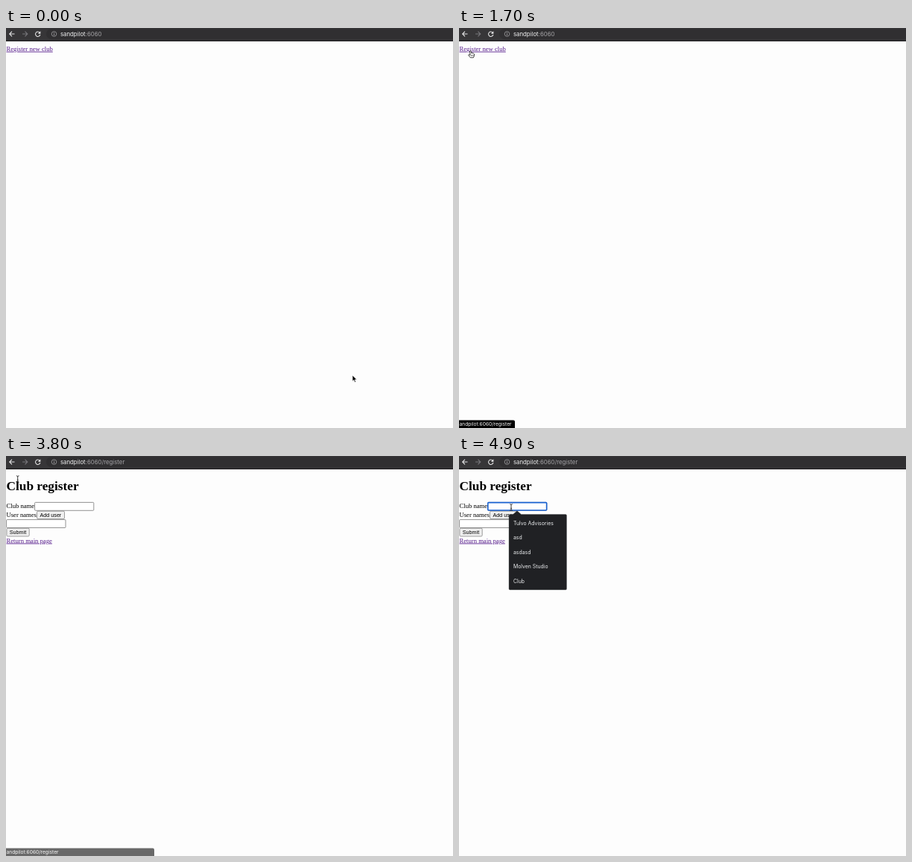
An HTML page for the animation above (5 s loop, 600 by 538 pixels).

```html
<!DOCTYPE html>
<html lang="en">
<head>
<meta charset="utf-8">
<title>Club register</title>
<style>
  html, body { margin: 0; width: 100%; height: 100%; overflow: hidden; background: #fdfdfd; }
  svg { display: block; width: 100vw; height: 100vh; }
  .ui { font-family: Inter, sans-serif; }
  .page { font: 8.65px "Liberation Serif", serif; }
  .page h1, .heading { font-size: 17.3px; font-weight: bold; }
  .link { fill: #551a8b; text-decoration: underline; }
  .field { fill: #fff; stroke: #767676; stroke-width: .8; }
  .button rect { fill: #efefef; stroke: #767676; stroke-width: .7; }
  .button text { font: 7.2px "Liberation Sans", sans-serif; }
  .icon { fill: none; stroke: #e4e4e5; stroke-width: 1.1; }
</style>
</head>
<body>
<svg viewBox="0 0 600 538">
  <g id="home" class="page">
    <text id="registerLink" class="link" x=".5" y="30.7">Register new club</text>
  </g>

  <g id="form" class="page">
    <text class="heading" x=".5" y="46">Club register</text>
    <text x=".5" y="70.2">Club name</text>
    <rect class="field" x="38.6" y="62.4" width="79.2" height="10.9" rx="1"/>
    <text x=".5" y="81.6">User names</text>
    <g class="button">
      <rect x="41.5" y="74.2" width="37" height="10.4" rx="1.5"/>
      <text x="45.5" y="81.8">Add user</text>
    </g>
    <rect class="field" x=".6" y="85.6" width="79.4" height="10.9" rx="1"/>
    <g class="button">
      <rect x=".9" y="97.2" width="30.3" height="10.8" rx="1.5"/>
      <text x="4.8" y="105.1">Submit</text>
    </g>
    <text class="link" x=".5" y="116.5">Return main page</text>
    <rect id="focus" x="38.8" y="62.6" width="78.8" height="10.4" rx="1" fill="#fff" stroke="#1a62d2" stroke-width="1.6"/>
  </g>

  <g id="popup" class="ui" font-size="6.9" fill="#eceef0">
    <path d="M68.5 78.5H72.5L78 73.8 83.5 78.5H143a1.5 1.5 0 0 1 1.5 1.5V178.500a1.500 1.500 0 0 1-1.500 1.500H68.500a1.500 1.500 0 0 1-1.500-1.500V80a1.500 1.500 0 0 1 1.500-1.500z" fill="#202124" stroke="#55565a" stroke-width=".4"/>
  </g>

  <g id="bar" class="ui" font-size="7.8">
    <rect width="600" height="18" fill="#373638"/>
    <rect y="16.5" width="600" height="1.5" fill="#252426"/>
    <rect x="54" y="1" width="560" height="14.2" rx="7.1" fill="#302f31"/>
    <path class="icon" d="M11.500 8H4.800M8 4.700 4.700 8 8 11.300"/>
    <path class="icon" d="M22 8h6.700M25.500 4.700 28.800 8 25.500 11.300" style="stroke:#77767a"/>
    <path class="icon" d="M45.300 6.300A3.200 3.200 0 1 0 45.900 8.800"/>
    <path d="M46.400 4.200V7.700H42.900z" fill="#e4e4e5"/>
    <circle class="icon" cx="64.500" cy="8" r="3.300" style="stroke:#a3a2a5;stroke-width:.8"/>
    <path d="M64.500 6v.9M64.500 7.500V10" stroke="#a3a2a5" stroke-width=".9"/>
    <text x="73" y="10.800" fill="#f0f0f1">sandpilot<tspan fill="#a5a4a7">:6060<tspan id="path">/register</tspan></tspan></text>
  </g>

  <g id="status" class="ui" font-size="6.65">
    <path id="bubble" fill="#000"/>
    <text x="-3" y="535.300" fill="#f4f4f4">sandpilot:6060/register</text>
  </g>

  <g id="arrow">
    <path d="M0 0V8.200L1.900 6.500 3.200 9.400 4.600 8.800 3.300 5.900H5.900z" fill="#000" stroke="#fff" stroke-width=".7"/>
  </g>
  <g id="hand">
    <path d="M-1 .4Q-.2-.6.6.4L1.200 3 2.600 2.900 4 3.400 5 4.200 4.800 7 3.900 9H-.2L-2.700 6Q-3 4.800-1.800 4.900L-.4 5.800z" transform="translate(0 .3)" fill="#fff" stroke="#111" stroke-width=".8" stroke-linejoin="round"/>
    <path d="M1.100 5.500v2M2.400 5.500v2M3.600 5.500v2" stroke="#222" stroke-width=".5"/>
  </g>
  <g id="beam">
    <path d="M-1.800-4.300Q0-4.300 0-3.200 0-4.300 1.800-4.300M0-3.300V3.300M-1.800 4.300Q0 4.300 0 3.200 0 4.300 1.800 4.300M-.9 1.400H.9" fill="none" stroke="#222" stroke-width=".9"/>
  </g>
</svg>
<script>
const LOOP = 5000, STEP = 100;
const $ = id => document.getElementById(id);
const show = (id, on) => { $(id).style.display = on ? "" : "none"; };

// Pointer: start time, shape, x, y
const pointer = [
  [0, "arrow", 465, 467],
  [400, "arrow", 418, 325],
  [500, "arrow", 341, 131.500],
  [800, "arrow", 172.500, 63.500],
  [900, "arrow", 1, 28.500],
  [1200, "hand", 15.500, 30.500],
  [3800, "beam", 15.700, 31],
  [3900, "beam", 50, 55],
  [4000, "arrow", 84, 78],
  [4400, "beam", 75, 71],
  [4500, "beam", 70, 69]
];

["Tulvo Advisories", "asd", "asdasd", "Molven Studio", "Club"].forEach((label, i) => {
  const text = document.createElementNS($("popup").namespaceURI, "text");
  text.setAttribute("x", 73);
  text.setAttribute("y", 92.500 + i * 19.500);
  text.textContent = label;
  $("popup").append(text);
});

function statusOpacity(t) {
  if (t < 1200) return 0;
  if (t < 3800) return Math.min(1, (t - 1100) / 600);
  return Math.max(0, .58 - (t - 3800) / 100 * .32);
}

function draw(now) {
  const t = Math.floor(now % LOOP / STEP) * STEP;
  const registering = t >= 3400;

  show("home", !registering);
  show("form", registering);
  show("path", registering);
  show("focus", t >= 4800);
  show("popup", t >= 4900);
  $("registerLink").style.fill = t >= 3300 ? "#333" : "";

  const right = registering ? 199 : 75;
  $("bubble").setAttribute("d", `M0 527.500H${right - 2}q2 0 2 2V538H0z`);
  $("status").style.opacity = t >= 4000 ? 0 : statusOpacity(t);

  const [, shape, x, y] = pointer.findLast(p => p[0] <= t);
  for (const id of ["arrow", "hand", "beam"]) show(id, id === shape);
  $(shape).setAttribute("transform", `translate(${x} ${y})`);
}

const start = performance.now();
function tick() {
  draw(performance.now() - start);
  requestAnimationFrame(tick);
}
tick();
</script>
</body>
</html>
```
